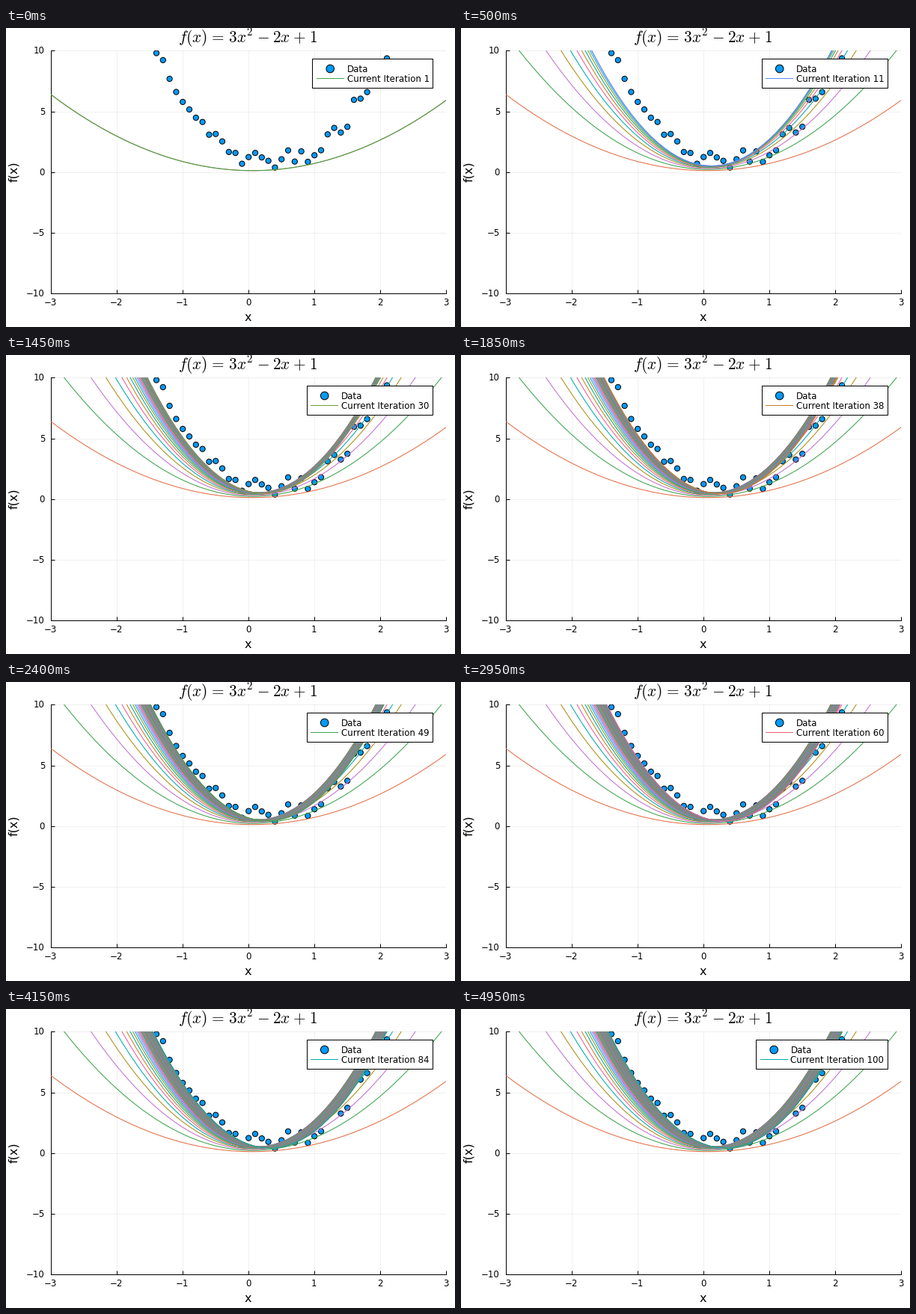
A matplotlib script that plays this animation: 600x400 px, repeating every 5 s.

```python
import numpy as np
import matplotlib.pyplot as plt
from matplotlib.animation import FuncAnimation
from matplotlib.collections import LineCollection
from matplotlib.patches import Circle, Rectangle

W, H, DPI = 600, 400, 100
PX = 72 / DPI  # points per pixel
STEPS = 100
RATE = 1e-4
PALETTE = ["#009AFA", "#E36F47", "#3EA44E", "#C371D2", "#AC8E18", "#00AAAE",
           "#ED5E93", "#C68225", "#00A98D", "#8E971E", "#00A9CC", "#9B7FE9",
           "#618DF6", "#F06073", "#DD65B6", "#6C9F33"]

plt.rcParams["font.family"] = "DejaVu Sans"
plt.rcParams["mathtext.fontset"] = "cm"


def series_color(i):
    return PALETTE[i % len(PALETTE)]


# Noisy samples of the parabola; the noise covers x = -1.4 to 1.8 and 2.1
x = np.arange(-30, 31) / 10
y = 3 * x**2 - 2 * x + 1
y[16:49] = [9.80, 9.22, 7.68, 6.60, 5.78, 5.16, 4.48, 4.13, 3.08, 3.14, 2.53,
            1.66, 1.58, 0.69, 1.24, 1.58, 1.21, 0.93, 0.38, 1.06, 1.79, 0.87,
            1.71, 0.85, 1.39, 1.80, 3.11, 3.64, 3.26, 3.73, 5.95, 6.05, 6.59]
y[51] = 9.37


def descend():
    """Curves met by gradient descent on the squared error."""
    basis = np.stack([x**2, x, np.ones_like(x)], axis=1)
    coef = np.zeros(3)
    curves = []
    for _ in range(STEPS):
        coef = coef + 2 * RATE * basis.T @ (y - basis @ coef)
        curves.append(np.column_stack([x, basis @ coef]))
    return curves


curves = descend()
colors = [series_color(i + 1) for i in range(STEPS)]

fig = plt.figure(figsize=(W / DPI, H / DPI), dpi=DPI, facecolor="white")

# Plot area
left, top, width, height = 60.2, 30.3, 528, 325
ax = fig.add_axes([left / W, 1 - (top + height) / H, width / W, height / H])
ax.set(xlim=(-3, 3), ylim=(-10, 10),
       xticks=range(-3, 4), yticks=range(-10, 11, 5))
ax.tick_params(direction="in", length=5 * PX, width=PX,
               labelbottom=False, labelleft=False)
ax.grid(color="black", alpha=0.06, linewidth=PX)
ax.set_axisbelow(True)
for side in ("top", "right"):
    ax.spines[side].set_visible(False)
for side in ("left", "bottom"):
    ax.spines[side].set_linewidth(PX)

# One colour per dot keeps their centres off the pixel grid
ax.scatter(x, y, s=(7.2 * PX)**2, c=[PALETTE[0]] * len(x), edgecolors="black",
           linewidths=PX, snap=False, zorder=2)
trail = LineCollection([], linewidths=1.05 * PX, zorder=3)
ax.add_collection(trail, autolim=False)
current, = ax.plot([], [], linewidth=1.05 * PX, zorder=4)

# Text and legend, laid out in pixels
hud = fig.add_axes([0, 0, 1, 1], facecolor="none")
hud.set(xlim=(0, W), ylim=(H, 0))
hud.axis("off")


def label(px, py, text, size=11.7, ha="center", **kw):
    return hud.text(px, py, text, fontsize=size * PX, ha=ha, va="baseline",
                    **kw)


def number(v):
    return str(v).replace("-", "\u2212")


def spaced(sign, gap):
    return rf"\hspace{{{gap}}}{sign}\hspace{{{gap}}}"


for v in range(-3, 4):
    label(59.8 + 88 * (v + 3), 371, number(v))
for v in range(-10, 11, 5):
    label(52, 192.6 - 16.25 * v + 4.3, number(v), ha="right")
label(323.3, 391.5, "x", 16)
label(15, 192.2, "f(x)", 16, rotation=90, rotation_mode="anchor")
equals, minus, plus = spaced("=", 0.115), spaced("-", 0.05), spaced("+", 0.05)
label(323, 19.7, f"$f(x){equals}3x^2{minus}2x{plus}1$", 21.3)

box = Rectangle((409, 41), 161, 39, facecolor="white", edgecolor="black",
                linewidth=PX)
key_dot = Circle((0, 54.5), 5.3, facecolor=PALETTE[0], edgecolor="black",
                 linewidth=PX, snap=False)
hud.add_patch(box)
hud.add_patch(key_dot)
key_line, = hud.plot([], [], linewidth=PX)
data_text = label(0, 59.3, "Data", ha="left")
step_text = label(0, 72.3, "", ha="left")


def draw(i):
    step = i + 1
    color = series_color(step + 1)
    trail.set_segments(curves[:step])
    trail.set_color(colors[:step])
    current.set_data(*curves[i].T)
    current.set_color(color)

    # The legend widens by one digit at a time
    x0 = 409.4 - 7.5 * (len(str(step)) - 1)
    box.set_x(x0)
    box.set_width(570 - x0)
    key_dot.set_center((x0 + 23.8, 54.5))
    key_line.set_data([x0 + 5.5, x0 + 41.5], [67.4, 67.4])
    key_line.set_color(color)
    data_text.set_x(x0 + 46.1)
    step_text.set_x(x0 + 46.1)
    step_text.set_text(f"Current Iteration {step}")
    return trail, current, box, key_dot, key_line, data_text, step_text


anim = FuncAnimation(fig, draw, frames=STEPS, interval=50, repeat=True,
                     repeat_delay=0)
plt.show()
```
